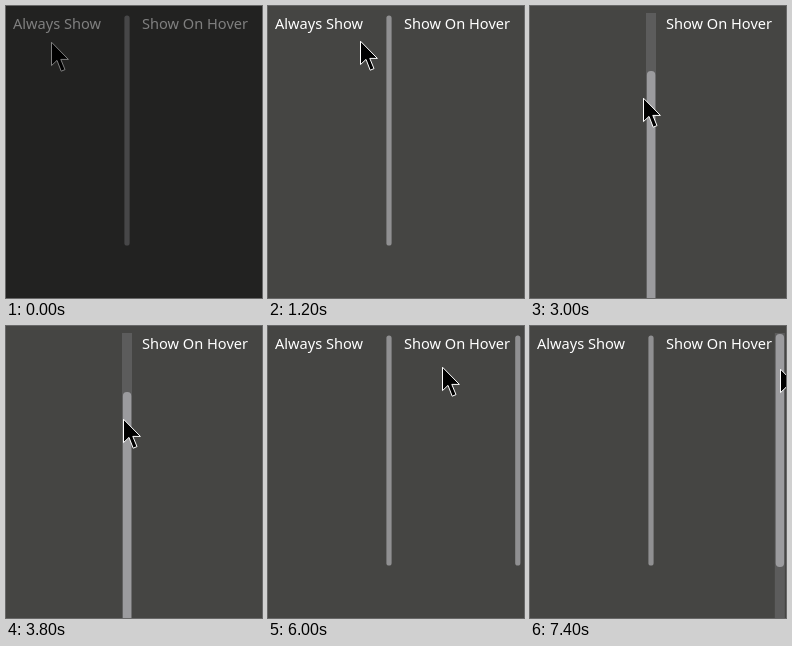
An HTML page that plays this animation: 256 px wide and 292 px high, repeating every 8000 ms.

```html
<!DOCTYPE html>
<html lang="en">
<head>
<meta charset="utf-8">
<title>Scrollbar visibility</title>
<style>
  html, body { margin: 0; width: 100%; height: 100%; overflow: hidden; background: #454543; }
  svg { display: block; width: 256px; height: 292px; }
  text { font: 14.6px "Noto Sans", "Open Sans", sans-serif; fill: #fff; }
  .slim { fill: #909092; }
  .track { fill: #5c5c5c; }
  .thumb { fill: #9b9b9e; }
</style>
</head>
<body>
<svg viewBox="0 0 256 292">
  <defs>
    <clipPath id="view"><rect y="7" width="256" height="285"/></clipPath>
    <g id="slim"><rect class="slim" x="118.4" y="9.5" width="5.2" height="230" rx="2.6"/></g>
    <g id="track"><rect class="track" x="116" y="7" width="10" height="300"/></g>
    <g id="thumb"><rect class="thumb" x="116.9" y="8" width="8.4" height="233" rx="4"/></g>
  </defs>
  <rect width="256" height="292" fill="#454543"/>
  <g clip-path="url(#view)">
    <text id="leftLabel" x="7" y="23">Always Show</text>
    <text x="136" y="23">Show On Hover</text>
  </g>
  <use id="leftSlim" href="#slim"/>
  <g id="leftWide"><use href="#track"/><use id="leftThumb" href="#thumb"/></g>
  <g transform="translate(128.8)">
    <use id="rightSlim" href="#slim"/>
    <g id="rightWide"><use href="#track"/><use href="#thumb"/></g>
  </g>
  <path id="cursor" d="M.5 1.2V24.6L6 19.4L10.2 30.2L14 28.6L9.8 18.4H17.4Z" fill="#000" stroke="#fff"/>
  <rect id="dim" width="256" height="292" fill="#000" opacity=".5"/>
</svg>
<script>
const LOOP = 8000, STEP = 200;
// time, x, y of the pointer tip
const path = [
  [0, 45, 35], [400, 45, 35], [1600, 114, 33], [2000, 119, 31], [2200, 119, 31],
  [3000, 113, 91], [3400, 114, 116], [4600, 124, 25], [5200, 124, 25],
  [6000, 174, 40], [6400, 187, 43], [6600, 187, 43], [7400, 250, 42], [LOOP, 250, 42]
];
const el = id => document.getElementById(id);
const show = (id, on) => { el(id).style.display = on ? '' : 'none'; };
const move = (id, x, y) => el(id).setAttribute('transform', `translate(${x} ${y})`);

const rate = (i, axis) => (path[i + 1][axis] - path[i][axis]) / (path[i + 1][0] - path[i][0]);

// Monotone slope: flat at rests and turning points
function slope(i, axis) {
  if (i === 0 || i === path.length - 1) return 0;
  const a = rate(i - 1, axis), b = rate(i, axis);
  return a * b > 0 ? 2 * a * b / (a + b) : 0;
}

function position(t, axis) {
  const i = path.findIndex((key, k) => t >= key[0] && t < path[k + 1][0]);
  const span = path[i + 1][0] - path[i][0];
  const u = (t - path[i][0]) / span, v = 1 - u;
  return path[i][axis] * v * v * (1 + 2 * u) + path[i + 1][axis] * u * u * (3 - 2 * u)
    + span * u * v * (slope(i, axis) * v - slope(i + 1, axis) * u);
}

const start = performance.now();
function draw() {
  const t = Math.floor((performance.now() - start) % LOOP / STEP) * STEP;
  const x = Math.round(position(t, 1)), y = Math.round(position(t, 2));
  const leftHover = t >= 1800 && t < 5400;
  const dragging = t >= 2200 && t < 4600;
  const scroll = dragging ? Math.max(0, Math.round((y - 31) * 0.95)) : 0;
  const rightHover = x >= 245;

  move('cursor', x, y);
  move('leftThumb', 0, scroll);
  move('leftLabel', 0, -scroll * 1.5);
  show('leftWide', leftHover);
  show('leftSlim', !leftHover);
  show('rightWide', rightHover);
  show('rightSlim', x > 127 && !rightHover);
  show('dim', t < STEP);
  requestAnimationFrame(draw);
}
draw();
</script>
</body>
</html>
```
